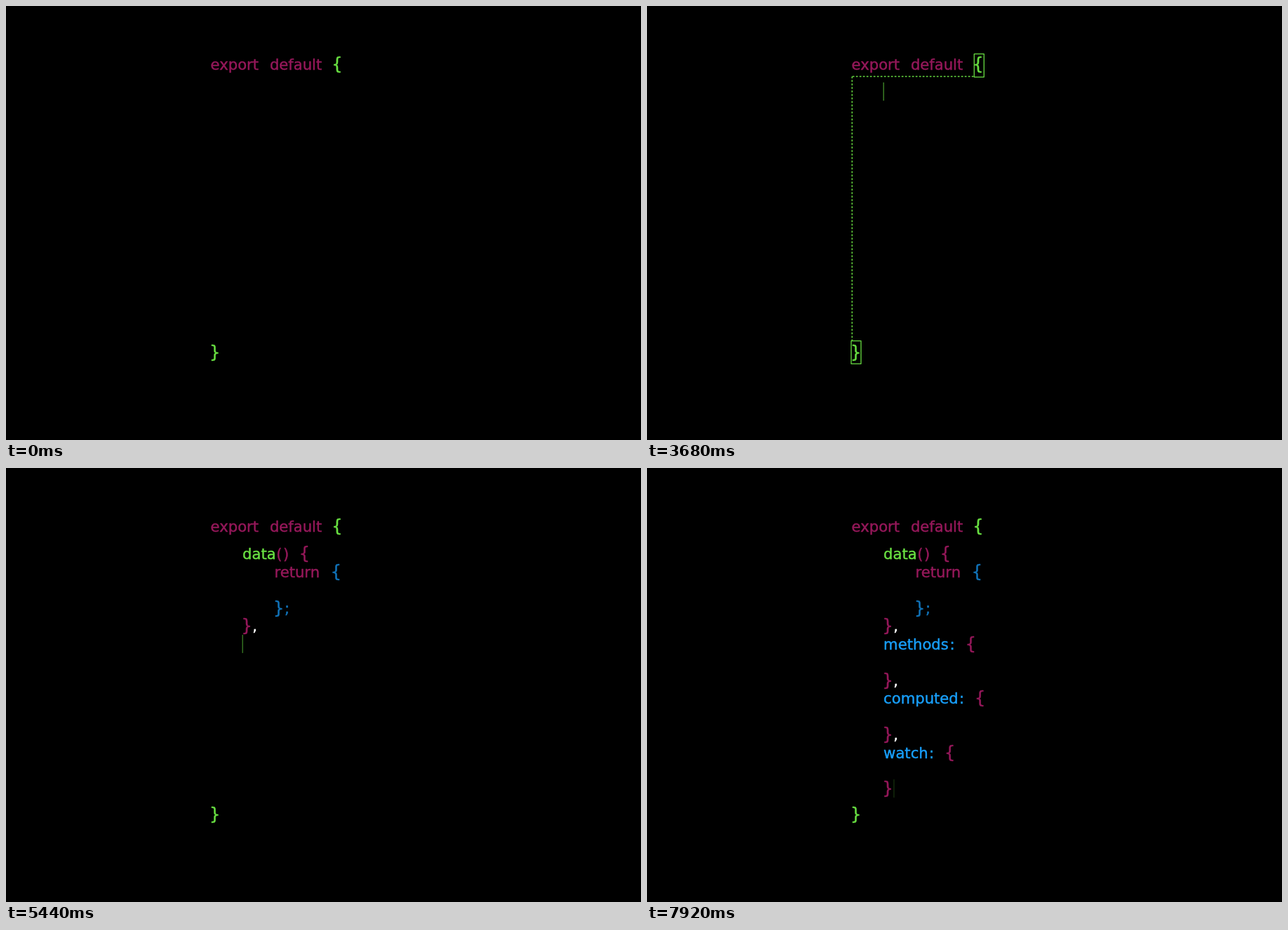
Recreate the animation shown at these times as an HTML page with a canvas. Size 905x619 px, loop 8000 ms.

```html
<!DOCTYPE html>
<html lang="en">
<head>
<meta charset="utf-8">
<title>Component outline</title>
<style>
html, body { margin: 0; width: 100%; height: 100%; overflow: hidden; background: #000; }
canvas { display: block; }
</style>
</head>
<body>
<canvas id="stage" width="905" height="619"></canvas>
<script>
const ctx = document.getElementById('stage').getContext('2d');
const LOOP = 8000, INDENT = 336.5;
const GREEN = '#69e042', MAGENTA = '#95185a', NAVY = '#1173b9', BLUE = '#189ffb', WHITE = '#fff';

// x, line, colour, text, keystrokes (spaces, returns, tabs) before it
const runs = [
  [INDENT, 0, GREEN, 'data', 0], [384.7, 0, MAGENTA, '(', 0],
  [394.3, 0, MAGENTA, ')', 0], [418.6, 0, MAGENTA, '{', 1],
  [381.8, 1, MAGENTA, 'return', 2], [463.6, 1, NAVY, '{', 1],
  [381.8, 3, NAVY, '}', 3], [396.5, 3, NAVY, ';', 0],
  [INDENT, 4, MAGENTA, '}', 1], [350.6, 4, WHITE, ',', 0],
  [INDENT, 5, BLUE, 'methods', 1], [431, 5, BLUE, ':', 0], [454.6, 5, MAGENTA, '{', 1],
  [INDENT, 7, MAGENTA, '}', 2], [350.6, 7, WHITE, ',', 0],
  [INDENT, 8, BLUE, 'computed', 1], [444.4, 8, BLUE, ':', 0], [468, 8, MAGENTA, '{', 1],
  [INDENT, 10, MAGENTA, '}', 2], [350.6, 10, WHITE, ',', 0],
  [INDENT, 11, BLUE, 'watch', 1], [401.4, 11, BLUE, ':', 0], [425, 11, MAGENTA, '{', 1],
  [INDENT, 13, MAGENTA, '}', 2]
];
// time, keystrokes typed
const pace = [[4200, 0.5], [5440, 27.5], [6960, 51.5], [7920, 69.5]];

const lineY = n => 130.2 + n * 25.78;
const ramp = (t, from, to) => Math.min(1, Math.max(0, (t - from) / (to - from)));
const ease = p => 0.5 - 0.5 * Math.cos(Math.PI * p);
const setFont = size => { ctx.font = size + 'px "DejaVu Sans", Verdana, sans-serif'; };

function typedAt(t) {
  if (t < pace[0][0]) return 0;
  for (let i = 1; i < pace.length; i++) {
    const [t0, n0] = pace[i - 1], [t1, n1] = pace[i];
    if (t < t1) return Math.floor(n0 + (n1 - n0) * (t - t0) / (t1 - t0));
  }
  return 69;
}

// Braces are set larger than words; a hairline outline gives the text its weight.
function write(text, x, y, color) {
  const brace = /[{}]/.test(text);
  setFont(brace ? 24 : 21.15);
  x += brace ? -0.9 : 0.6;
  ctx.fillStyle = ctx.strokeStyle = color;
  ctx.lineWidth = 0.45;
  ctx.fillText(text, x, y);
  ctx.strokeText(text, x, y);
}

function line(x0, y0, x1, y1) {
  ctx.beginPath();
  ctx.moveTo(x0, y0);
  ctx.lineTo(x1, y1);
  ctx.stroke();
}

function drawLinks(t) {
  const fade = 1 - ease(ramp(t, 3600, 4600));
  ctx.strokeStyle = GREEN;
  ctx.lineWidth = 1.3;
  ctx.globalAlpha = fade * ramp(t, 40, 700);
  ctx.strokeRect(466.3, 68.3, 14, 33);
  ctx.globalAlpha = fade * ramp(t, 2720, 3400);
  ctx.strokeRect(291, 477.7, 14, 32.6);

  ctx.globalAlpha = fade;
  ctx.lineWidth = 1.5;
  ctx.setLineDash([2.7, 2.3]);
  const across = ease(ramp(t, 702, 1702)), down = ease(ramp(t, 1702, 2702));
  if (across) line(465.5, 100.6, 465.5 - 173.5 * across, 100.6);
  if (down) line(292.3, 100.6, 292.3, 100.6 + 377.4 * down);
  ctx.setLineDash([]);
  ctx.globalAlpha = 1;
}

function drawTyping(t) {
  let left = typedAt(t), x = INDENT + 0.7, row = 0;
  for (const [rx, rowTo, color, text, wait] of runs) {
    if (left <= 0) break;
    if (left < wait) {
      x = INDENT + 0.7;
      row = Math.min(rowTo, row + left);
      break;
    }
    left -= wait;
    const part = text.slice(0, left);
    write(part, rx, lineY(rowTo), color);
    setFont(21.15);
    x = rx + (part ? ctx.measureText(part).width + 2 : 0.7);
    row = rowTo;
    left -= text.length;
  }
  if (t < 3680) return;
  ctx.globalAlpha = 0.6 - 0.4 * ramp(t, 4160, 7920) ** 1.6;
  ctx.fillStyle = GREEN;
  ctx.fillRect(x - 0.7, lineY(row) - 21.2, 1.4, 26);
  ctx.globalAlpha = 1;
}

function draw(now) {
  const t = now % LOOP;
  ctx.fillStyle = '#000';
  ctx.fillRect(0, 0, 905, 619);
  write('export', 291, 91, MAGENTA);
  write('default', 375.3, 91, MAGENTA);
  write('{', 465.2, 91.2, GREEN);
  write('}', 291, 501.5, GREEN);
  drawLinks(t);
  drawTyping(t);
  requestAnimationFrame(draw);
}
ctx.lineJoin = 'round';
requestAnimationFrame(draw);
</script>
</body>
</html>
```
